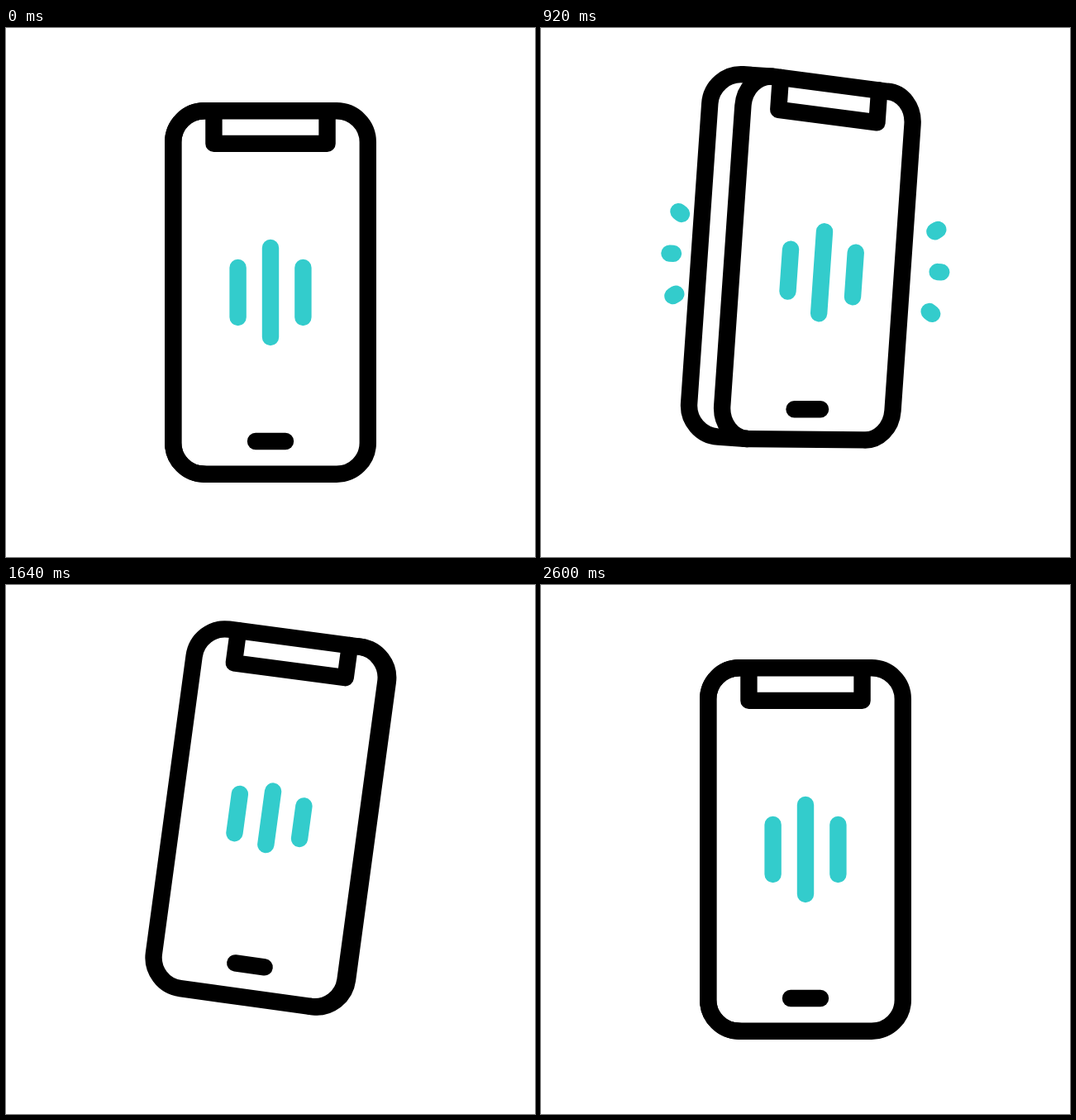
Animation, 640 px wide and 640 px high, one loop 3000 ms. Source, as an HTML page:

```html
<!DOCTYPE html>
<html lang="en">
<head>
<meta charset="utf-8">
<title>Vibrating phone</title>
<style>
  html, body { margin: 0; width: 100%; height: 100%; overflow: hidden; background: #fff; }
  svg { display: block; width: 100vw; height: 100vh; }
  path { fill: none; stroke-width: 20.4; stroke-linecap: round; stroke-linejoin: round; }
  .ink { stroke: #000; }
  .accent { stroke: #3cc; }
</style>
</head>
<body>
<svg viewBox="0 0 640 640">
  <g id="phone">
    <path id="rays" class="accent"/>
    <g id="body">
      <path id="back" class="ink"/>
      <path id="front" class="ink"/>
      <path id="notch" class="ink"/>
      <path id="home" class="ink"/>
    </g>
    <path id="wave" class="accent"/>
  </g>
</svg>
<script>
const LOOP = 3000, STEP = 20;
const HALF_W = 117.8, H = 219.7, R = 37.8;
const SHAKE_START = 1035, SHAKE_END = 1551, SWING = 258;
const $ = id => document.getElementById(id);
const [phone, rays, body, back, front, notch, home, wave] =
  ['phone', 'rays', 'body', 'back', 'front', 'notch', 'home', 'wave'].map($);

const clamp = (v, lo, hi) => Math.min(hi, Math.max(lo, v));
const progress = (t, from, to) => clamp((t - from) / (to - from), 0, 1);
const smooth = p => p * p * (3 - 2 * p);
const ramp = (t, from, to) => smooth(progress(t, from, to));

// Dip, jump, hold, drop, settle
const posY = t => 320 + 30 * ramp(t, 200, 470) - 68.3 * ramp(t, 470, 900)
  + 65.8 * ramp(t, 1815, 2130) - 27.5 * ramp(t, 2130, 2600);

// Lean back, shake, lean again, stand up
function tilt(t) {
  const swing = (clamp(t, SHAKE_START, SHAKE_END) - SHAKE_START) / SWING;
  return 10 * Math.cos(Math.PI * swing) - 10
    - 6.9 * ramp(t, 200, 750) + 16.9 * ramp(t, 750, SHAKE_START)
    - 16.4 * ramp(t, SHAKE_END, 1930) + 6.4 * ramp(t, 1930, 2380);
}

// 1 shows the left side of the phone, -1 the right side
function turn(t) {
  const p = progress(t, 1110, 2120);
  return ramp(t, 200, 640) - p - smooth(p) + ramp(t, 2140, 2600);
}

// Half-heights of the three bars at shared beats
const beats = [200, 720, 1140, 1400, 1860, 2220, 2600];
const bars = [
  [30, 12, 41, 18, 29, 18, 30],
  [54, 67, 29.5, 50, 17.3, 41.5, 54],
  [30, 25, 29, 20, 20, 27.3, 30]
];
const barHeight = (levels, t) => levels.reduce((h, level, i) =>
  i ? h + (level - levels[i - 1]) * ramp(t, beats[i - 1], beats[i]) : level, 0);

function drawBody(q) {
  const k = Math.abs(q), d = 8.4 * k;
  const near = -HALF_W + 29.4 * k, far = HALF_W, w = far - near;
  const scale = w / (2 * HALF_W), rx = R * scale, edge = -HALF_W - 10.8 * k;
  const left = near + rx, right = far - rx;
  const top = x => -H + d * (x - left) / (right - left);

  body.setAttribute('transform', q < 0 ? 'scale(-1 1)' : '');
  back.setAttribute('d', `M${left} ${-H}H${edge + R}A${R} ${R} 0 0 0 ${edge} ${R - H}`
    + `V${H - R}A${R} ${R} 0 0 0 ${edge + R} ${H}H${left}`);
  const arc = `A${rx} ${R} 0 0 1 `;
  front.setAttribute('d', `M${left} ${-H}L${right} ${d - H}${arc}${far} ${d - H + R}`
    + `V${H - R - d}${arc}${right} ${H - d}L${left} ${H}${arc}${near} ${H - R}`
    + `V${R - H}${arc}${left} ${-H}Z`);
  const n0 = near + .209 * w, n1 = near + .791 * w, base = 39.6 - H;
  notch.setAttribute('d', `M${n0} ${top(n0)}L${n0} ${base}`
    + `L${n1} ${base + .85 * d}L${n1} ${top(n1)}`);
  const mid = (near + far) / 2, half = 18 * scale;
  home.setAttribute('d', `M${mid - half} 180L${mid + half} ${180 - .25 * d}`);
}

function drawWave(t, q) {
  const y = q > 0 ? 12.7 * q : -5.6 * q;
  wave.setAttribute('d', bars.map((levels, i) => {
    const x = 20.5 * q + (i - 1) * 39.4, h = barHeight(levels, t);
    return `M${x} ${y - h}V${y + h}`;
  }).join(''));
}

// Each ray runs outwards: its tip eases out, its tail eases in
function drawRays(t) {
  const p = progress(t, 900, 1380);
  const tail = 51 * p ** 2.2 - 10, tip = 41 - 51 * (1 - p) ** 2.2;
  let d = '';
  if (tip - tail > .5) {
    for (const side of [-1, 1]) {
      for (const row of [-1, 0, 1]) {
        const x = row ? 161.7 : 170.2, dx = row ? .815 : 1, dy = row * .58;
        const at = s => `${side * (x + dx * s)} ${2.3 + row * 54.3 + dy * s}`;
        d += `M${at(tail)}L${at(tip)}`;
      }
    }
  }
  rays.setAttribute('d', d);
}

function render(now) {
  const t = Math.floor((now % LOOP) / STEP) * STEP, q = turn(t);
  phone.setAttribute('transform', `translate(320 ${posY(t)}) rotate(${tilt(t)})`);
  drawBody(q);
  drawWave(t, q);
  drawRays(t);
}

const begin = performance.now();
function frame() {
  render(performance.now() - begin);
  requestAnimationFrame(frame);
}
frame();
</script>
</body>
</html>
```
